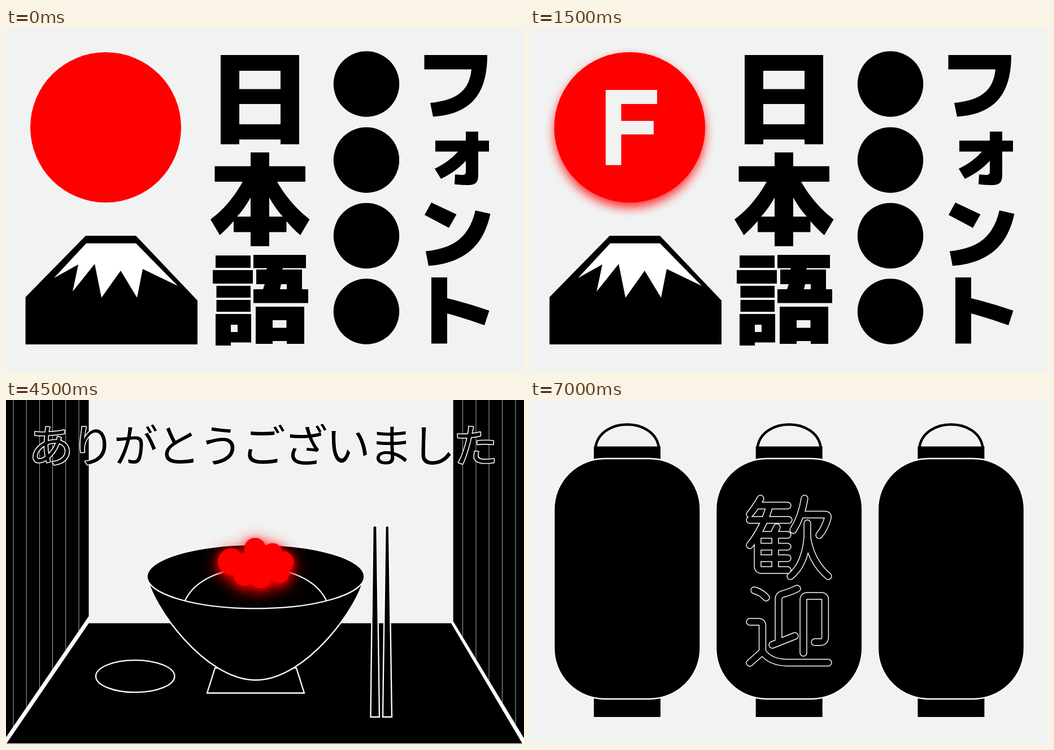
Recreate the animation shown at these times as an HTML page. Size 917 px wide and 611 px high, loop 8 s.

```html
<!DOCTYPE html>
<html lang="ja">
<head>
<meta charset="utf-8">
<title>日本語フォント</title>
<style>
html, body { margin: 0; width: 100%; height: 100%; overflow: hidden; background: #f1f3f2; }
svg { display: block; width: 100%; height: 100%; }

.poster, .meal, .lanterns, .late { animation: 8s step-end infinite; }
.poster { animation-name: poster; }
.meal { animation-name: meal; }
.late { animation-name: late; }
.lanterns { animation-name: lanterns; }
.blink { animation: blink 1s step-end infinite; }

@keyframes poster { 0% { opacity: 1 } 37.5%, 100% { opacity: 0 } }
@keyframes meal { 0% { opacity: 0 } 37.5% { opacity: 1 } 87.5%, 100% { opacity: 0 } }
@keyframes late { 0% { opacity: 0 } 50%, 100% { opacity: 1 } }
@keyframes lanterns { 0% { opacity: 0 } 87.5%, 100% { opacity: 1 } }
@keyframes blink { 0% { opacity: 0 } 50%, 100% { opacity: 1 } }

.red { fill: #f00; }
.paper { fill: #f1f3f2; }
.line { stroke: #fff; stroke-width: 2.3; }
.sun-glow { filter: drop-shadow(0 9px 9px rgb(255 0 0 / .8)); }
.roe-glow { filter: drop-shadow(0 4px 8px rgb(255 0 0 / .75)) drop-shadow(0 4px 14px rgb(255 0 0 / .75)); }
.thanks {
  font: 400 79px "Noto Sans CJK JP", "Noto Sans CJK", sans-serif;
  letter-spacing: -3.8px;
  text-anchor: middle;
  paint-order: stroke;
  stroke: #fff;
  stroke-width: 3.2;
  stroke-linejoin: round;
}
.brush { fill: none; stroke-linecap: round; stroke-linejoin: round; }
</style>
</head>
<body>
<svg viewBox="0 0 917 611" preserveAspectRatio="none">
  <defs>
    <g id="roe">
      <circle cx="398.500" cy="287" r="23.500"/>
      <circle cx="441" cy="264" r="19"/>
      <circle cx="472" cy="272.500" r="18"/>
      <circle cx="490" cy="288" r="19.500"/>
      <circle cx="484" cy="308" r="17.500"/>
      <circle cx="450.500" cy="311" r="23"/>
      <circle cx="421" cy="312" r="18"/>
      <ellipse cx="444" cy="292" rx="40" ry="25"/>
    </g>
    <g id="lantern">
      <path d="M116 84C124 30 220 30 228 84" fill="none" stroke="#000" stroke-width="4.500"/>
      <path d="M113 82.500H231V120H113ZM113 510H231V563H113Z"/>
      <rect class="line" x="42.500" y="104" width="259" height="427" rx="90"/>
    </g>
    <g id="welcome">
      <!-- 歓 -->
      <path d="M408 175Q400 190 389 203M400 187.500H456M389 213H458M424 188Q414 226 389 258"/>
      <path d="M437 226L431 239M408 239.500H456M403 245V295Q403 302 410 302H456M403 260.500H456M403 281H456M434 240V302"/>
      <path d="M486 175Q481 207 466 231M480 203.500H520Q529 203 527 210Q522 228 512 240"/>
      <path d="M491 219V245C488 275 479 299 461 313M491 245C496 275 509 297 528 313"/>
      <!-- 迎 -->
      <path d="M397 338Q409 341 418 351M389 394H405Q411.500 394 411.500 401V447L389 467M411.500 447Q425 466 455 466.500H528"/>
      <path d="M473 335Q458 342 446 345Q440 347 440 354V430M429 435L469 419"/>
      <path d="M484 449V355Q484 348 491 348H516Q522.500 348 522.500 355V421Q522.500 430 514 430H504"/>
    </g>
    <path id="walls" d="M0 0H146.500V384L0 599ZM791.700 0H917V601L791.700 393Z"/>
    <clipPath id="wall-clip"><use href="#walls"/></clipPath>
  </defs>

  <g class="poster">
    <circle class="red" cx="176.500" cy="176.500" r="133.500"/>
    <g class="blink">
      <circle class="red sun-glow" cx="176.500" cy="176.500" r="133.500"/>
      <path class="paper" role="img" aria-label="F" d="M134 110H225V135H161.500V165H219V189H161.500V243.500H134Z"/>
    </g>

    <path d="M34.500 478L141 369H230L339 484V562H34.500Z"/>
    <path fill="#fff" d="M142 382.500H230L304 458L242 428L232 479L203 431L169 479L157 419L118 468L128 420L85 444Z"/>

    <g role="img" aria-label="日本語" fill-rule="evenodd">
      <path d="M380 48H519V206.500H486V198H413V206.500H380ZM413 76H486V108.500H413ZM413 135H486V171H413Z"/>
      <path d="M433 221H466V245.500H530V273H480C495 300 515 322 537.500 340L521 368Q507 356 496.500 343V362.500H466V387.500H433V362.500H403V343Q392 356 378.500 368L362 340C386 322 404 300 419 273H369.500V245.500H433ZM433 301V335H409Q422 321 433 301ZM466 301V335H490Q477 321 466 301Z"/>
      <path d="M371 404H433V426H371ZM366 430H437V454H366ZM372.500 458H433V479H372.500ZM372.500 483H433V504H372.500ZM371 508H434V558.500H398V564H371ZM398 527H410V540H398Z"/>
      <path d="M438 403H531V426.500H490L489 429H524V464H535V488.500H438V464H455L458 455H443V429H461L462 426.500H438ZM487 455L485 464H497V455Z"/>
      <path d="M442 495H528V561H497V556H472V561H442ZM472 519H496.500V532.500H472Z"/>
    </g>

    <circle cx="638" cy="99.500" r="58.200"/>
    <circle cx="638" cy="234.500" r="58.200"/>
    <circle cx="638" cy="369" r="58.200"/>
    <circle cx="638" cy="503.500" r="58.200"/>

    <g role="img" aria-label="フォント">
      <path d="M740.500 48H852C852 115 825 153 756 157.500L751 133C798 128 820 112 824 73.500H740.500Z"/>
      <path d="M814 184H836V200H855V219.500H836V260C836 275 831 279 817 279Q806 279 794 277.500L795 260Q803 261 808 261Q814 261 814 256V236C802 249 788 259 770 268L759 250C777 241 790 231 800 219.500H760V200H814Z"/>
      <path d="M753 310L797.500 331L784 355L741 332ZM831 324L857.500 330C845 388 811 417 748 422.500L743 396.500C795 391 820 370 831 324Z"/>
      <path d="M753 443H781V480Q818 489 855.500 502L847 528Q814 516 781 507V560.500H753Z"/>
    </g>
  </g>

  <g class="meal">
    <path fill="#fff" d="M146.500 384L0 599V611H917V601L791.700 393L788 396.600H146.500Z"/>
    <use href="#walls"/>
    <path d="M146.500 396.600H788L914 610H1Z"/>
    <path clip-path="url(#wall-clip)" stroke="#aaa" d="M13 0V611M36.200 0V611M59.400 0V611M82.500 0V611M105.700 0V611M129 0V611M808.500 0V611M832 0V611M855 0V611M878.500 0V611M902 0V611"/>

    <g class="line">
      <ellipse cx="228.700" cy="490.700" rx="69.700" ry="28.500"/>
      <path d="M370 476L356 520.500H528L514 476Z"/>
      <path d="M250 314C258 365 352 497.500 442 497.500S626 365 634 314Z"/>
      <ellipse cx="442" cy="313.600" rx="192.500" ry="56.800"/>
      <path d="M317 356C335 318 385 298 442 298S549 318 567 356" fill="none"/>
      <path d="M649.500 223.500H656.500L661 563H645.500ZM671.500 223.500H678L683 563H667Z"/>
    </g>

    <g class="red">
      <g class="late"><g class="blink"><use href="#roe" class="roe-glow"/></g></g>
      <use href="#roe"/>
    </g>
    <text class="thanks" x="453.500" y="111">ありがとうございました</text>
  </g>

  <g class="lanterns">
    <use href="#lantern"/>
    <use href="#lantern" x="286.700"/>
    <use href="#lantern" x="573.400"/>
    <g class="brush" role="img" aria-label="歓迎">
      <use href="#welcome" stroke="#fff" stroke-width="13.300"/>
      <use href="#welcome" stroke="#000" stroke-width="10.400"/>
    </g>
  </g>
</svg>
</body>
</html>
```
